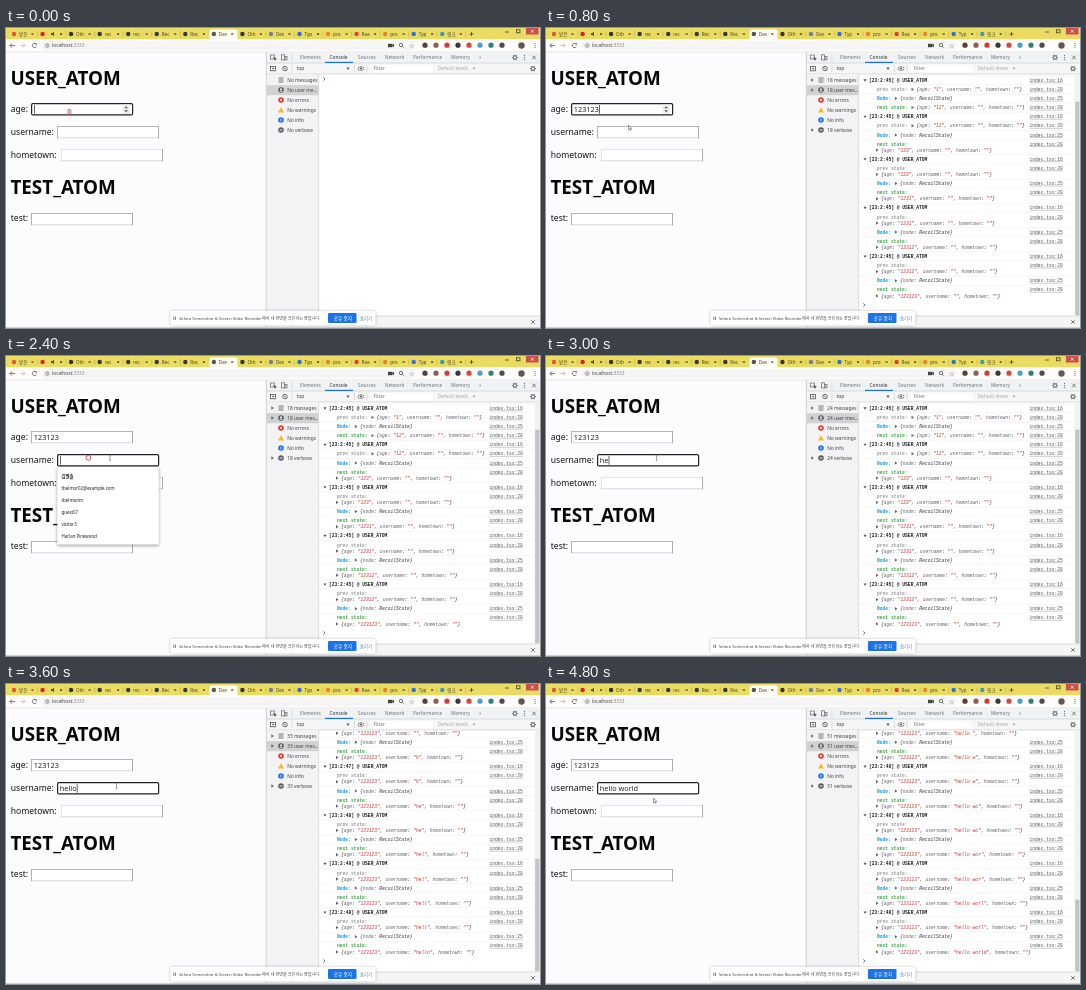
Write an HTML page with a canvas that moves like this. It is 534 px wide and 300 px high and loops after 5 s.

```html
<!DOCTYPE html>
<html lang="ko">
<head>
<meta charset="utf-8">
<style>
html, body { margin: 0; width: 534px; height: 300px; overflow: hidden; }
canvas { display: block; }
</style>
</head>
<body>
<canvas id="stage" width="534" height="300"></canvas>
<script>
const c = document.getElementById('stage').getContext('2d');
const SANS = '"Noto Sans", "Noto Sans CJK KR", sans-serif';
const MONO = '"Liberation Mono", monospace';
const CHAR = 2.78, ROW = 9.1, WRAP = 6.1;
const VIEW_TOP = 46.5, VIEW_BOTTOM = 288;

function box(x, y, w, h, fill) {
  c.fillStyle = fill;
  c.fillRect(x, y, w, h);
}
function round(x, y, w, h, r, fill, stroke, width = 1) {
  c.beginPath();
  c.roundRect(x, y, w, h, r);
  if (fill) { c.fillStyle = fill; c.fill(); }
  if (stroke) { c.strokeStyle = stroke; c.lineWidth = width; c.stroke(); }
}
function dot(x, y, r, fill) {
  c.beginPath();
  c.arc(x, y, r, 0, 7);
  c.fillStyle = fill;
  c.fill();
}
function ring(x, y, r, color, width = 0.8) {
  c.beginPath();
  c.arc(x, y, r, 0, 7);
  c.strokeStyle = color;
  c.lineWidth = width;
  c.stroke();
}
function line(color, width, ...p) {
  c.beginPath();
  for (let i = 0; i < p.length; i += 2) c.lineTo(p[i], p[i + 1]);
  c.strokeStyle = color;
  c.lineWidth = width;
  c.stroke();
}
function poly(fill, ...p) {
  c.beginPath();
  for (let i = 0; i < p.length; i += 2) c.lineTo(p[i], p[i + 1]);
  c.fillStyle = fill;
  c.fill();
}
function text(s, x, y, size, color, style = '', family = SANS) {
  c.font = `${style} ${size}px ${family}`;
  c.fillStyle = color;
  c.fillText(s, x, y);
  return x + c.measureText(s).width;
}
const mono = (s, x, y, color, style) => text(s, x, y + 1.6, CHAR / 0.6, color, style, MONO);
const right = (x, y, color = '#666') => poly(color, x - 1, y - 1.7, x + 1.6, y, x - 1, y + 1.7);
const down = (x, y, color = '#555') => poly(color, x - 1.6, y - 1, x + 1.6, y - 1, x, y + 1.4);
const cross = (x, y, r, color) => {
  line(color, 0.8, x - r, y - r, x + r, y + r);
  line(color, 0.8, x + r, y - r, x - r, y + r);
};
function gear(x, y) {
  ring(x, y, 1.7, '#5f6368', 1);
  for (let a = 0; a < 6; a++) dot(x + 2.4 * Math.cos(a * 1.047), y + 2.4 * Math.sin(a * 1.047), 0.6, '#5f6368');
}
const more = (x, y) => [-2, 0, 2].forEach(d => dot(x, y + d, 0.6, '#555'));

function browser() {
  box(0, 0, 534, 300, '#fcfbfd');
  box(0, 0, 534, 11.5, '#eadb62');
  const tabs = '받은,,Oth,rec,rec,Rec,Rec,Dev,Oth,Dev,Typ,pro,Rea,pro,Typ,링크'.split(',');
  const colors = ['#e4572e', '#e3221c', '#333', '#333a46', '#333a46', '#333a46', '#333a46', '#555', '#333', '#6f7fa8',
    '#2f6fd0', '#e8852c', '#df3f36', '#e8852c', '#2f6fd0', '#2f9fbd'];
  round(203.5, 1.5, 28, 12, 2, '#fdfcf3');
  tabs.forEach((name, i) => {
    const x = 8 + i * 28.55;
    dot(x, 6, 2.2, colors[i]);
    text(name, x + 5, 7.7, 4.6, '#4a4524');
    cross(x + 18.5, 6, 1, '#4f4924');
    if (i != 6 && i != 7) line('#b5a944', 0.5, x + 23.5, 3, x + 23.5, 9);
  });
  poly('#5b5328', 45, 5, 46.5, 5, 48, 3.7, 48, 8.3, 46.5, 7, 45, 7);
  line('#4a4524', 0.8, 463.5, 6, 467.5, 6);
  line('#4a4524', 0.8, 465.5, 4, 465.5, 8);
  line('#4a4524', 0.8, 499, 4, 503, 4);
  c.strokeRect(510.5, 1.8, 3.5, 3);
  box(520, 0, 12.5, 6.5, '#c9504a');
  cross(526.3, 3.2, 1.4, '#fff');

  box(0, 11.5, 534, 12.5, '#fefdfc');
  line('#555', 0.8, 9, 17.5, 4, 17.5, 6, 15.3);
  line('#555', 0.8, 4, 17.5, 6, 19.7);
  line('#bbb', 0.8, 14, 17.5, 19, 17.5, 17, 15.3);
  line('#bbb', 0.8, 19, 17.5, 17, 19.7);
  c.beginPath();
  c.arc(28.5, 17.5, 2.2, 0.5, 5.6);
  c.strokeStyle = '#555';
  c.stroke();
  poly('#555', 29.2, 16.6, 31, 16.6, 31, 14.8);
  round(36, 12.8, 374, 9.4, 4.7, '#f5f5f6');
  ring(41.2, 17.5, 1.9, '#666', 0.6);
  box(40.9, 16.4, 0.6, 2.3, '#666');
  const hostEnd = text('localhost', 46, 19.3, 4.8, '#444');
  text(':3333', hostEnd, 19.3, 4.8, '#888');
  box(382, 15.8, 4.5, 3.4, '#444');
  poly('#444', 386, 17.5, 388, 15.8, 388, 19.2);
  ring(395, 17, 1.7, '#555');
  line('#555', 0.8, 396.2, 18.2, 397.6, 19.7);
  text('☆', 403, 19.6, 6, '#555', '', '"DejaVu Sans", sans-serif');
  ['#5a3c3a', '#8a5f58', '#d83d32', '#3a3a3c', '#d8483c', '#4d9ccd', '#35806f', '#4a4c50']
    .forEach((color, i) => dot(419 + i * 11, 17.2, 2.6, color));
  dot(515.5, 17.5, 3.2, '#68584a');
  more(529, 17.5);
  line('#dcdcdc', 0.7, 0, 24, 534, 24);
}

function input(x, y, focused, value, caret, edge = '#a6a6aa') {
  if (focused) round(x + 0.6, y + 0.6, 101, 11.3, 1.2, '#fff', '#222', 1.2);
  else {
    box(x, y, 102, 12.2, '#d4d4d7');
    box(x, y, 102, 0.9, edge);
    box(x, y, 0.9, 12.2, edge);
    box(x + 101.1, y, 0.9, 12.2, '#9c9ca0');
    box(x + 0.9, y + 0.9, 100.2, 10.4, '#fff');
  }
  const end = text(value, x + 2.8, y + 8.7, 7.3, '#222');
  if (caret) box(end + 0.2, y + 2, 0.7, 8.6, '#222');
}

function page(s) {
  text('USER_ATOM', 4.4, 56.5, 18.85, '#080808', 'bold');
  text('TEST_ATOM', 4.4, 166, 18.85, '#080808', 'bold');
  [['age:', 83.5], ['username:', 106.7], ['hometown:', 130], ['test:', 193.4]]
    .forEach(([label, y]) => text(label, 4.7, y, 8.6, '#141414'));
  input(25, 75, !s.onName, s.state.age, !s.onName && s.caret);
  if (!s.onName) {
    box(116.5, 76.5, 7.5, 9.3, '#efefef');
    poly('#555', 118.3, 80.2, 122, 80.2, 120.1, 78.2);
    poly('#555', 118.3, 82.3, 122, 82.3, 120.1, 84.3);
  }
  input(51, 98, s.onName, s.typedName, s.onName && s.caret);
  input(55, 121, false, '', false, '#e2e2e5');
  input(25, 185, false, '');
}

function suggestions() {
  c.shadowColor = '#0005';
  c.shadowBlur = 3;
  c.shadowOffsetY = 1;
  box(51.3, 111, 101.5, 77.5, '#fff');
  c.shadowColor = 'transparent';
  ['김별솔', 'tbelmor02@example.com', 'tbelmorim', 'guest07', 'visitor3', 'Harlan Pinewood']
    .forEach((name, i) => text(name, 55.5, 122 + i * 12, 4.4, '#222', i ? '' : 'bold'));
}

function stateAt(n) {
  return { age: '123123'.slice(0, n), username: 'hello world'.slice(0, Math.max(0, n - 6)), hometown: '' };
}

function preview(pairs, x, y) {
  right(x, y);
  const put = (s, color) => { x = mono(s, x, y, color, 'italic'); };
  x += 4;
  put('{', '#333');
  pairs.forEach(([key, value, color], i) => {
    put((i ? ', ' : '') + key, '#67606b');
    put(': ', '#333');
    put(value, color);
  });
  put('}', '#333');
}
const pairsOf = state => Object.entries(state).map(([k, v]) => [k, `"${v}"`, '#c4312b']);
const sizeOf = state => 37 + state.age.length + state.username.length;

function entryRows(n, scrolls) {
  const wraps = state => sizeOf(state) > (scrolls ? 39 : 40);
  const before = stateAt(n - 1), after = stateAt(n);
  return [
    { link: 16, title: `[23:2:${n < 2 ? 44 : n < 7 ? 45 : n < 9 ? 47 : 48}] @ USER_ATOM` },
    { link: 20, label: 'prev state:', color: '#999', pairs: pairsOf(before), wrap: wraps(before) },
    { link: 25, label: 'Node:', color: '#159be0', pairs: [['node', 'RecoilState', '#333']] },
    { link: 28, label: 'next state:', color: '#3da447', pairs: pairsOf(after), wrap: wraps(after) }
  ];
}

function logs(count) {
  const collect = scrolls => Array.from({ length: count }, (_, i) => entryRows(i + 1, scrolls)).flat();
  const height = rows => rows.reduce((h, r) => h + ROW + (r.wrap ? WRAP : 0), ROW + 2);
  const view = VIEW_BOTTOM - VIEW_TOP;
  let rows = collect(false);
  const scrolls = height(rows) > view;
  if (scrolls) rows = collect(true);
  const total = height(rows);
  let y = scrolls ? 277 - (total - ROW - 2) : 51;
  const linkX = scrolls ? 483.5 : 488.5;

  c.save();
  c.beginPath();
  c.rect(313, VIEW_TOP, 221, view);
  c.clip();
  for (const r of rows) {
    line('#f0eff1', 0.6, 313, y - 4.5, 528, y - 4.5);
    if (r.title) {
      down(319, y);
      mono(r.title, 323, y, '#222', 'bold');
    } else {
      const end = mono(r.label, 331, y, r.color, 'bold');
      preview(r.pairs, r.wrap ? 331 : end + 5, r.wrap ? y + WRAP : y);
    }
    mono('index.tsx:' + r.link, linkX, y, '#555');
    line('#777', 0.4, linkX, y + 2.5, linkX + 12 * CHAR, y + 2.5);
    y += ROW + (r.wrap ? WRAP : 0);
  }
  line('#367cf1', 0.9, 317.3, y - 1.6, 319, y, 317.3, y + 1.6);
  if (scrolls) {
    box(528.5, VIEW_TOP, 5.5, view, '#f2f2f3');
    const thumb = view * view / total;
    box(529.2, VIEW_BOTTOM - thumb, 4.2, thumb - 1, '#c3c3c5');
  }
  c.restore();
}

function sidebar(count) {
  box(260.5, 46.5, 52, 241.5, '#f3f2f4');
  box(260.5, 57.2, 52, 10, '#d2d1d3');
  line('#d0d0d0', 0.7, 312.7, 46, 312.7, 288);
  const n = count || 'No';
  [`${n} messages`, count ? `${n} user mes…` : 'No user me…', 'No errors', 'No warnings', 'No info', `${n} verbose`]
    .forEach((label, i) => {
      const y = 52 + i * 10;
      if (count && (i < 2 || i == 5)) right(266.3, y);
      if (i == 0) [-2, 0, 2].forEach(d => box(272.5, y + d - 0.4, 5, 0.8, '#555'));
      else if (i == 3) poly('#f5bd17', 275, y - 2.8, 278, y + 2.4, 272, y + 2.4);
      else dot(275, y, 2.8, ['', '#56585c', '#e23b30', '', '#1b73e8', '#5d5e63'][i]);
      if (i == 1) {
        dot(275, y - 0.8, 0.9, '#fff');
        box(273.6, y + 0.6, 2.8, 1, '#fff');
      }
      if (i == 2) cross(275, y, 1.1, '#fff');
      if (i == 4) box(274.6, y - 1.4, 0.8, 2.9, '#fff');
      if (i == 5) box(273.6, y - 0.4, 2.8, 0.9, '#fff');
      text(label, 281.3, y + 1.8, 4.8, '#444');
    });
}

function devtools(s) {
  box(260, 24, 274, 276, '#fff');
  box(260, 24, 274, 11, '#f1f2f3');
  box(260, 35, 274, 11, '#f6f6f7');
  line('#cfcfd2', 0.7, 260, 35, 534, 35);
  line('#cfcfd2', 0.7, 260, 46, 534, 46);
  c.strokeStyle = '#666';
  c.strokeRect(264.5, 27, 4, 4);
  poly('#555', 267, 29, 270.8, 30.6, 268.8, 32.8);
  c.strokeRect(275.5, 26.8, 3, 5.2);
  c.strokeRect(279, 28.5, 2, 3.5);
  line('#ccc', 0.6, 286, 26, 286, 33);
  [['Elements', 294], ['Console', 323.5], ['Sources', 352], ['Network', 379], ['Performance', 407], ['Memory', 445], ['»', 473]]
    .forEach(([name, x]) => text(name, x, 31.2, 4.8, name == 'Console' ? '#333' : '#6f7378'));
  box(319, 33.8, 28, 1.2, '#1a73e8');
  gear(509, 29.5);
  more(518.5, 29.5);
  cross(528, 29.5, 1.8, '#555');

  c.strokeStyle = '#555';
  c.lineWidth = 0.8;
  c.strokeRect(264.5, 38.4, 5, 4.4);
  poly('#555', 266.5, 39.4, 268.6, 40.6, 266.5, 41.8);
  ring(279, 40.6, 2.3, '#555');
  line('#555', 0.8, 277.4, 39, 280.6, 42.2);
  line('#ccc', 0.6, 286, 37, 286, 44);
  text('top', 290.5, 42.4, 5, '#444');
  down(342, 40.6);
  line('#ccc', 0.6, 348.5, 37, 348.5, 44);
  c.beginPath();
  c.ellipse(355, 40.6, 3, 1.9, 0, 0, 7);
  c.strokeStyle = '#555';
  c.stroke();
  dot(355, 40.6, 1, '#555');
  line('#ccc', 0.6, 361, 37, 361, 44);
  round(365, 37, 62, 7.3, 0.5, '#fff');
  text('Filter', 367.5, 42.4, 4.9, '#777');
  text('Default levels', 431.5, 42.4, 4.9, '#aaa');
  down(468, 40.6, '#aaa');
  gear(527, 40.6);

  sidebar(s.count);
  logs(s.logged);
  box(260, 288, 274, 12, '#f5f5f6');
  line('#ccc', 0.7, 260, 288, 534, 288);
  cross(527, 294, 1.8, '#555');
  line('#c8c8cb', 0.8, 260.3, 24, 260.3, 300);
  box(0, 299.2, 534, 0.8, '#d6cc84');
}

function shareBar() {
  c.shadowColor = '#0004';
  c.shadowBlur = 3;
  c.shadowOffsetY = 0;
  round(164.5, 283, 205, 14.5, 1.5, '#fff');
  c.shadowColor = 'transparent';
  box(167.5, 288.5, 0.7, 3.5, '#555');
  box(169, 288.5, 0.7, 3.5, '#555');
  text('Velora Screenshot & Screen Video Recorder에서 내 화면을 공유하는 중입니다.', 173, 291.6, 4.1, '#444');
  round(322, 285, 28.5, 10, 1.2, '#1a73e8');
  text('공유 중지', 327.5, 291.8, 4.8, '#fff');
  text('숨기기', 354, 291.8, 4.4, '#3a7de0');
}

function arrow(x, y) {
  const outline = [x, y, x, y + 4.8, x + 1.1, y + 3.9, x + 1.9, y + 5.4, x + 2.6, y + 5, x + 1.9, y + 3.6, x + 3.3, y + 3.5, x, y];
  poly('#fff', ...outline);
  line('#555', 0.6, ...outline);
}
function beam(x, y) {
  line('#777', 0.7, x, y - 2.8, x, y + 2.8);
  line('#777', 0.5, x - 1, y - 2.8, x + 1, y - 2.8);
  line('#777', 0.5, x - 1, y + 2.8, x + 1, y + 2.8);
}
function pointer(step) {
  if (step < 2) {
    if (!step) round(61.8, 81.7, 3.2, 4.6, 0.8, '', '#e24c4c', 0.7);
    beam(63.3, 84);
  } else if (step < 4) arrow(80.5, 96);
  else if (step < 10) arrow(82.5, 97);
  else if (step < 12) beam(82.5, 102);
  else if (step < 24) beam(step < 13 ? 104 : 110.5, 102);
  else arrow(107.5, 114);
  if (step == 11 || step == 12) ring(82.3, 101.8, 2.4, '#e23c3c', 0.9);
}

// Number of keys pressed at each 200 ms step; the console lags in a few of them.
const KEYS = [0, 1, 3, 5, 6, 6, 6, 6, 6, 6, 6, 6, 6, 6, 7, 8, 9, 10, 11, 13, 14, 16, 17, 17, 17];
const LAGGING = { 14: 6, 15: 6, 16: 8, 17: 9 };

function draw() {
  const step = Math.floor(performance.now() % 5000 / 200);
  const keys = KEYS[step], state = stateAt(keys);
  const s = {
    state,
    typedName: state.username,
    onName: step >= 12,
    caret: !(step >= 6 && step <= 8 || step == 11 || step == 24),
    count: 3 * keys,
    logged: LAGGING[step] ?? keys
  };
  browser();
  page(s);
  if (step == 12) suggestions();
  devtools(s);
  shareBar();
  pointer(step);
  requestAnimationFrame(draw);
}
draw();
</script>
</body>
</html>
```
